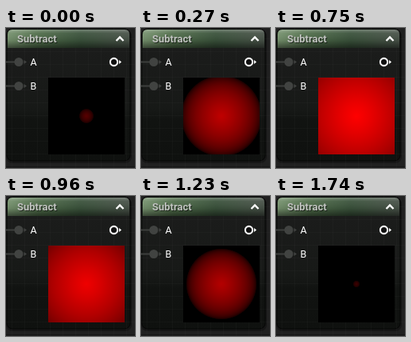
An HTML page with a canvas for the animation above (1.77 s loop, 162x175 px).

```html
<!DOCTYPE html>
<html lang="en">
<head>
<meta charset="utf-8">
<title>Subtract node</title>
<style>
  html, body { margin: 0; width: 100%; height: 100%; overflow: hidden; background: #202020; }
  svg, canvas { position: absolute; left: 0; top: 0; display: block; }
  canvas { left: 53px; top: 62px; }
  text { font-family: Roboto, Arial, sans-serif; }
</style>
</head>
<body>
<svg width="162" height="175" viewBox="0 0 162 175">
  <defs>
    <linearGradient id="tint">
      <stop offset="0" stop-color="#77936f"/>
      <stop offset=".25" stop-color="#4f6c49"/>
      <stop offset=".6" stop-color="#39513a"/>
      <stop offset="1" stop-color="#485248"/>
    </linearGradient>
    <linearGradient id="gloss" x2="0" y2="1">
      <stop offset="0" stop-color="#fff" stop-opacity=".28"/>
      <stop offset=".2" stop-color="#fff" stop-opacity=".06"/>
      <stop offset=".6" stop-color="#000" stop-opacity=".08"/>
      <stop offset="1" stop-color="#000" stop-opacity=".5"/>
    </linearGradient>
    <linearGradient id="body" x2="0" y2="1">
      <stop offset=".15" stop-color="#1b1c1b"/>
      <stop offset=".6" stop-color="#171917"/>
      <stop offset=".7" stop-color="#111311"/>
      <stop offset="1" stop-color="#0f110f"/>
    </linearGradient>
    <pattern id="grid" width="16" height="16" x="7" y="13" patternUnits="userSpaceOnUse">
      <path d="M.5 0V16M0 .5H16" stroke="#fff" stroke-opacity=".02"/>
    </pattern>
    <path id="head" d="M2 25V8Q2 2 8 2H149Q155 2 155 8V25z"/>
    <g id="input">
      <path d="M0 0H12" stroke="#3c3e3c" stroke-width="2"/>
      <circle cx="16" r="5.5" fill="#414341"/>
      <path d="M22.5-2.5L26 0l-3.5 2.5z" fill="#414341"/>
    </g>
  </defs>
  <rect width="162" height="175" fill="#202020"/>
  <rect x="0" y="2" width="158" height="167" rx="8" fill="#000" opacity=".3"/>
  <path d="M0 173.5H162" stroke="#101010"/>
  <rect x="1" y="1" width="155" height="165" rx="7" fill="url(#body)" stroke="#050605"/>
  <rect width="162" height="175" fill="url(#grid)"/>
  <use href="#head" fill="url(#tint)"/>
  <use href="#head" fill="url(#gloss)"/>
  <g font-size="13" font-weight="700">
    <text x="15" y="19" opacity=".6">Subtract</text>
    <text x="14" y="18" fill="#c0c3bf">Subtract</text>
  </g>
  <path d="M138.5 16l4.5-4.5 4.5 4.5" fill="none" stroke="#fff" stroke-width="2.3"/>
  <use href="#input" y="42.5"/>
  <use href="#input" y="72.5"/>
  <g font-size="12.5" fill="#fff">
    <text x="30.5" y="47">A</text>
    <text x="30.5" y="77">B</text>
  </g>
  <circle cx="135.5" cy="42.5" r="4.6" fill="#111" stroke="#fff" stroke-width="2.1"/>
  <path d="M142 40l3 2.5-3 2.5z" fill="#fff"/>
</svg>
<canvas width="96" height="96"></canvas>
<script>
const LOOP = 1770, STEP = 30, SIZE = 96, STOPS = 24;
const ctx = document.querySelector('canvas').getContext('2d');

// Wave phase in degrees at a few times; 0 is the brightest point.
const phases = [[0, -144], [150, -107.5], [390, -66], [1230, 94.5], [1440, 137], [1740, 204.5], [LOOP, 216]];

function phaseAt(t) {
  const i = phases.findIndex(([time]) => time > t);
  const [t0, p0] = phases[i - 1], [t1, p1] = phases[i];
  return p0 + (p1 - p0) * (t - t0) / (t1 - t0);
}

// Red channel = level minus distance from the centre, gamma corrected.
function draw(t) {
  const level = 0.5 + 0.5 * Math.cos(phaseAt(t) * Math.PI / 180);
  const mid = SIZE / 2;
  const glow = ctx.createRadialGradient(mid, mid, 0, mid, mid, Math.max(level * SIZE, 0.01));
  for (let i = STOPS; i >= 0; i--) {
    const share = (i / STOPS) ** 2;
    const red = 255 * (level * share) ** (1 / 2.2);
    glow.addColorStop(1 - share, `rgb(${red.toFixed(1)} 0 0)`);
  }
  ctx.fillStyle = glow;
  ctx.fillRect(0, 0, SIZE, SIZE);
}

const start = performance.now();
function frame() {
  const t = (performance.now() - start) % LOOP;
  draw(Math.floor(t / STEP) * STEP);
  requestAnimationFrame(frame);
}
frame();
</script>
</body>
</html>
```
